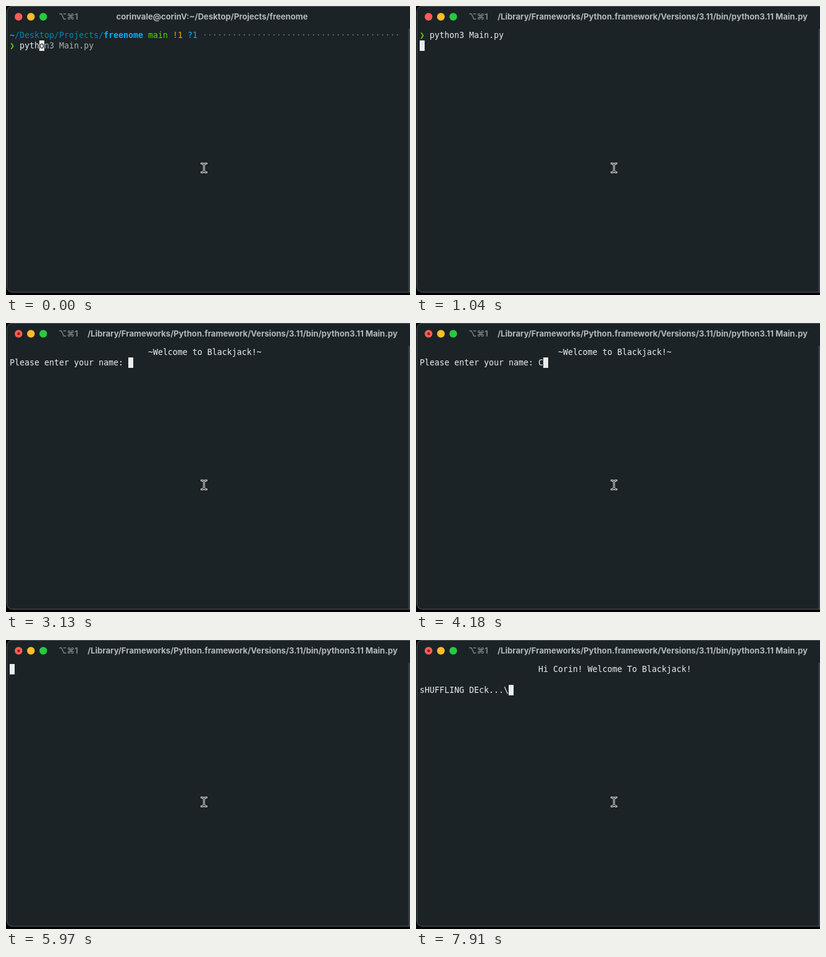
Animation of 654 by 470 pixels, one loop 8 s. Source, as an HTML page:

```html
<!DOCTYPE html>
<html lang="en">
<head>
<meta charset="utf-8">
<title>Blackjack in a terminal</title>
<style>
html, body { margin: 0; width: 100%; height: 100%; overflow: hidden; background: #000; }
svg { display: block; }
text { white-space: pre; }
.mono { font: 13.29px "DejaVu Sans Mono", "Liberation Mono", monospace; fill: #ececec; }
.bar { font: bold 13.12px Inter, "Liberation Sans", sans-serif; fill: #b4b8ba; }
.dim { fill: #7b8184; }
.path { fill: #0087af; }
.anchor { fill: #00afff; font-weight: bold; }
.branch { fill: #5fd700; }
.changed { fill: #d7af00; }
.new { fill: #00afff; }
.dots { fill: #6c7073; }
.hint { fill: #a9b2b6; }
.under { fill: #1b2327; }
</style>
</head>
<body>
<svg width="654" height="470" viewBox="0 0 654 470">
  <defs>
    <path id="beam" d="M316.5 256Q320.5 256 320.5 259V267.5Q320.5 270.5 316.5 270.5M324.5 256Q320.5 256 320.5 259M320.5 267.5Q320.5 270.5 324.5 270.5"/>
  </defs>
  <path d="M654 .5H11Q1.5 .5 1.5 10V456Q1.5 465.5 11 465.5H654" fill="#1b2327" stroke="#555b5d"/>
  <rect x="651.5" y="37" width="2.5" height="428" fill="#3c4346"/>
  <circle cx="20.3" cy="17.5" r="6.2" fill="#ff5f57"/>
  <circle cx="40.3" cy="17.5" r="6.2" fill="#febc2e"/>
  <circle cx="60.3" cy="17.5" r="6.2" fill="#28c840"/>
  <circle id="busy" cx="20.5" cy="17.5" r="2.2" fill="#8c1a10"/>
  <text class="bar dim" x="85" y="22">⌥⌘1</text>
  <text class="bar" id="title" y="22"></text>
  <rect id="cursor" width="8" height="17" fill="#ececec"/>
  <text class="mono" x="6" y="52"></text>
  <text class="mono" x="6" y="69"></text>
  <text class="mono" x="6" y="86"></text>
  <g fill="none" stroke-linecap="round">
    <use href="#beam" stroke="#fff" stroke-width="3"/>
    <use href="#beam" stroke="#111" stroke-width="1.2"/>
  </g>
</svg>
<script>
const LOOP = 8000;
const $ = id => document.getElementById(id);
const rows = document.querySelectorAll('.mono');
const span = (cls, s) => `<tspan class="${cls}">${s}</tspan>`;
const at = col => ' '.repeat(col);

const user = 'Corin';
const command = 'python3 Main.py';
const prompt = span('branch', '❯') + ' ';
const folder = span('anchor', '~') + span('path', '/Desktop/Projects/') + span('anchor', 'freenome') +
  ' ' + span('branch', 'main') + ' ' + span('changed', '!1') + ' ' + span('new', '?1') +
  ' ' + span('dots', '·'.repeat(40));
const suggestion = prompt + 'pyth' + span('under', 'o') + span('hint', 'n3 Main.py');
const welcome = at(28) + '~Welcome to Blackjack!~';
const greeting = at(24) + `Hi ${user}! Welcome To Blackjack!`;
const question = 'Please enter your name: ';

// Two more letters swap case on every step while the spinner turns.
function shuffling(step) {
  const n = 2 * step;
  const swap = c => c === c.toLowerCase() ? c.toUpperCase() : c.toLowerCase();
  const label = [...'Shuffling deck'].map((c, i) => i < n ? swap(c) : c).join('');
  return label + '...' + '|/-\\'[(n - 1) % 4];
}

const asking = n => [[welcome, question + user.slice(0, n)], 1, question.length + n];

// Returns [lines, cursor row, cursor column].
function screen(t) {
  if (t < 440) return [[folder, suggestion], 1, 6];
  if (t < 1040) return [[folder, prompt + command], 1, 17];
  if (t < 2080) return [[prompt + command], 1, 0];
  if (t < 3130) return [[welcome], 1, 0];
  if (t < 4180) return asking(0);
  if (t < 4330) return asking(1);
  if (t < 4470) return asking(4);
  if (t < 5070) return asking(5);
  if (t < 5970) return [[welcome, question + user], 2, 0];
  if (t < 7010) return [[], 0, 0];
  if (t < 7160) return [[greeting], 2, 0];
  return [[greeting, '', shuffling(Math.floor((t - 7010) / 150))], 2, 18];
}

function setTitle(text, x, anchor) {
  $('title').textContent = text;
  $('title').setAttribute('x', x);
  $('title').setAttribute('text-anchor', anchor);
}

function draw(t) {
  const [lines, row, col] = screen(t);
  rows.forEach((el, i) => el.innerHTML = lines[i] || '');
  $('cursor').setAttribute('x', 6 + 8 * col);
  $('cursor').setAttribute('y', 39 + 17 * row);
  $('busy').style.display = t < 1790 ? 'none' : '';
  if (t < 1040) setTitle('corinvale@corinV:~/Desktop/Projects/freenome', 333.5, 'middle');
  else setTitle('/Library/Frameworks/Python.framework/Versions/3.11/bin/python3.11 Main.py', 132, 'start');
}

const start = performance.now();
function tick() {
  draw((performance.now() - start) % LOOP);
  requestAnimationFrame(tick);
}
tick();
</script>
</body>
</html>
```
